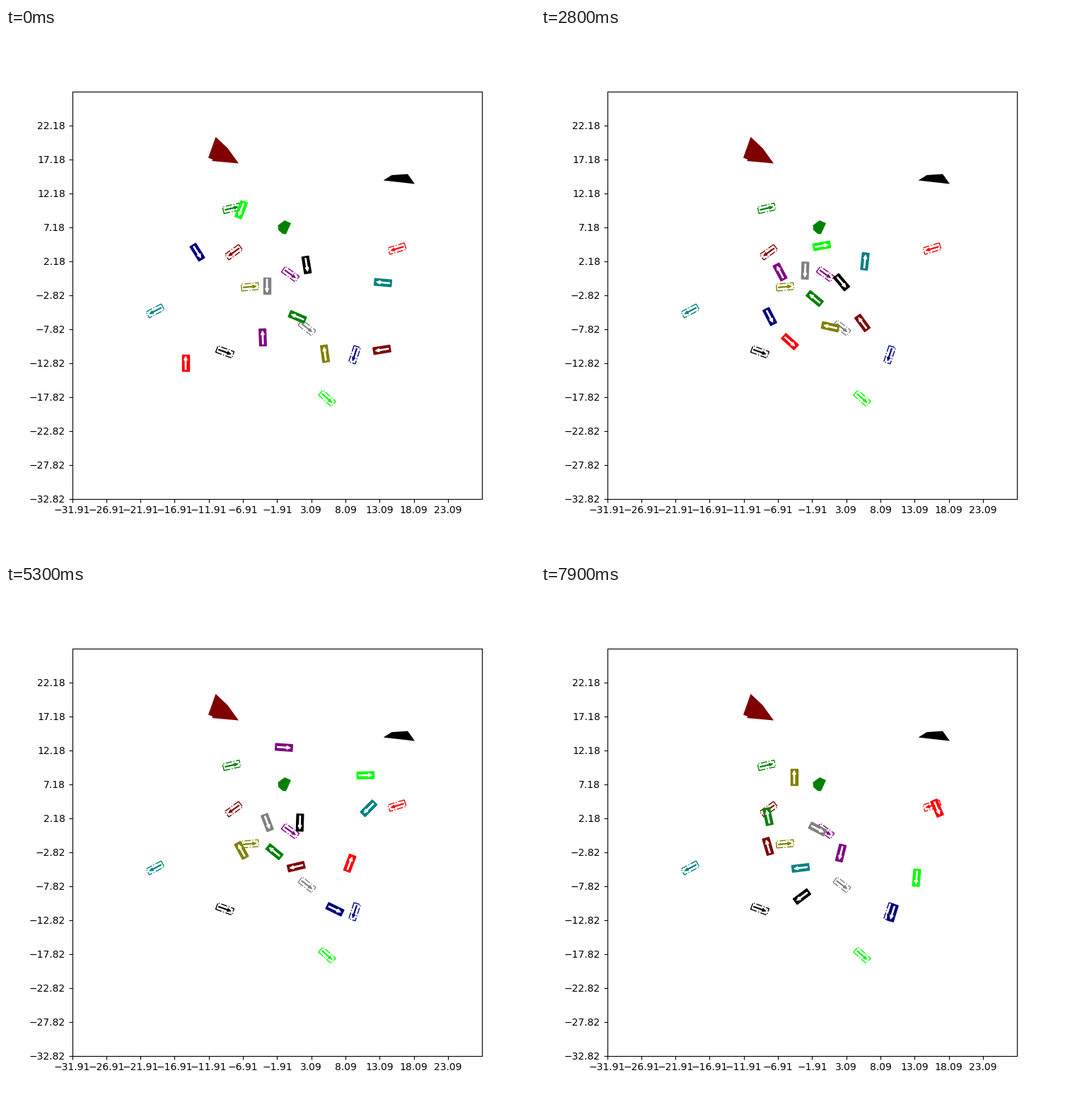
Write a matplotlib script that moves like this. It is 748 px wide and 748 px high and loops after 8000 ms.

```python
import numpy as np
import matplotlib.pyplot as plt
from matplotlib.animation import FuncAnimation
from matplotlib.patches import Polygon

SIZE, DPI = 748, 100
X0, Y0, SPAN = -31.91, -32.82, 60
LEFT, BASE = 0.125 * SIZE, 0.89 * SIZE
SX, SY = 0.775 * SIZE / SPAN, 0.77 * SIZE / SPAN
STEPS = np.array([0, 17, 27, 43, 60, 70, 78])

BOX = np.array([(-1.25, -0.5), (1.25, -0.5), (1.25, 0.5), (-1.25, 0.5)])
ARROW = np.array([(-0.98, -0.07), (0.4, -0.07), (0.4, -0.24), (0.95, 0),
                  (0.4, 0.24), (0.4, 0.07), (-0.98, 0.07)])


def to_data(px, py):
    return X0 + (px - LEFT) / SX, Y0 + (BASE - py) / SY


def place(shape, x, y, deg):
    a = np.radians(deg)
    c, s = np.cos(a), np.sin(a)
    return shape @ np.array([(c, s), (-s, c)]) + (x, y)


def key_slopes(rate):
    """Slopes at the keys: rest at the start, harmonic mean in between."""
    rate = np.array(rate, float)
    rate[0] *= 2            # the cars accelerate evenly from rest
    out = np.zeros(len(rate) + 1)
    for i, (a, b) in enumerate(zip(rate[:-1], rate[1:]), 1):
        if a * b > 0:
            out[i] = 2 * a * b / (a + b)
    out[-1] = rate[-1]
    return out


def hermite(u, p, q, m, n):
    return ((1 + 2 * u) * (1 - u) ** 2 * p + u * (1 - u) ** 2 * m
            + u * u * (3 - 2 * u) * q + u * u * (u - 1) * n)


class Car:
    def __init__(self, color, *keys):
        self.color = color
        keys = np.array(keys, float)
        x, y = to_data(keys[:, 0], keys[:, 1])
        deg = keys[:, 2]
        self.keys = np.column_stack([x, y, deg])
        dt = np.diff(STEPS)
        turn = np.diff(deg)
        move = np.diff(self.keys[:, :2], axis=0)
        mid = np.radians(deg[:-1] + turn / 2)
        way = np.where(move[:, 0] * np.cos(mid) + move[:, 1] * np.sin(mid) < 0, -1, 1)
        arc = np.hypot(*move.T) / np.sinc(turn / 360)
        speed = key_slopes(way * arc / dt)
        a = np.radians(deg)
        self.slopes = np.column_stack([speed * np.cos(a), speed * np.sin(a),
                                       key_slopes(turn / dt)])

    def pose(self, step):
        i = min(np.searchsorted(STEPS, step, side="right") - 1, len(STEPS) - 2)
        dt = STEPS[i + 1] - STEPS[i]
        return hermite((step - STEPS[i]) / dt, self.keys[i], self.keys[i + 1],
                       self.slopes[i] * dt, self.slopes[i + 1] * dt)

    def add(self, ax):
        self.box = ax.add_patch(Polygon(BOX, fc=self.color, ec=self.color, lw=1, zorder=3))
        self.arrow = ax.add_patch(Polygon(ARROW, fc="white", ec="white", lw=1, zorder=3))

    def move(self, step):
        pose = self.pose(step)
        self.box.set_xy(place(BOX, *pose))
        self.arrow.set_xy(place(ARROW, *pose))
        return [self.box, self.arrow]


# Each key: stage x, stage y, heading in degrees
teal = Car("teal", (533, 360, 175), (479.5, 370, 180), (458, 330, 84),
           (522, 277, -27), (456.5, 330, -195), (404, 352, -111), (367, 400, -173))
red = Car("red", (254, 473.5, 90), (295, 442, 22), (352, 443.5, -42),
          (439.5, 433.5, 40), (511, 350, 82), (538.5, 306, 9), (560, 315.5, -67))
green = Car("green", (412, 408.5, 157), (397.5, 394.5, 126), (387, 382.5, 140),
            (388, 383.5, 137), (366, 367.5, 146), (343.5, 361, 157), (321, 327.5, 102))
maroon = Car("maroon", (531.5, 455, 189), (482, 436, 152), (454.5, 417, 126),
             (416.5, 396.5, 195), (404, 399.5, 190), (358, 405, 160), (321, 369.5, 106))
olive = Car("olive", (451, 460.5, 98), (427.5, 429.5, 144), (409, 422.5, 167),
            (349, 417.5, 125), (321.5, 335, 112), (334.5, 297, 36), (358, 271.5, 90))
purple = Car("purple", (363, 437.5, 92), (341.5, 392.5, 98), (338, 345, 118),
             (340, 256, 45), (440, 247, -51), (438, 323, -113), (424, 379, -104))
gray = Car("gray", (369, 364.5, -90), (370, 356, -111), (373.5, 343, -92),
           (373.5, 347, -86), (366, 326.5, -52), (372, 332.5, -41), (391, 345, -28))
black = Car("black", (425, 335, -81), (429.5, 365, -62), (425, 359.5, -50),
            (414, 328, -87), (416, 351.5, -96), (407, 400, -114), (369, 440.5, -143))
navy = Car("navy", (270.5, 317, -58), (312.5, 352.5, -41), (323.5, 408, -63),
           (401.5, 469, 8), (497, 458, -70), (498, 465, -102), (497, 463.5, -107))
lime = Car("lime", (332.5, 257, -111), (346, 308, -42), (397, 308, 10),
           (468.5, 269.5, 45), (540, 302.5, -60), (559, 358.5, -117), (531, 414, -95))
CARS = [teal, red, green, maroon, olive, purple, gray, black, navy, lime]

GOALS = [(211, 400, 208), (553, 312, 197), (319, 255, 13), (322, 317, 216),
         (345, 366, 5), (402, 348, -36), (425.5, 424, -38), (309.5, 458, -20),
         (493, 462, 252), (454, 523.5, -42)]

BLOCKS = {
    "maroon": [(296.5, 154), (313.5, 170), (329, 191.5), (291, 188), (292.5, 186), (286, 183.5)],
    "green": [(394, 272), (403, 276), (396, 291.5), (391, 291), (385, 285.5), (384.5, 279)],
    "black": [(533.5, 215.5), (545.5, 208), (568, 206.5), (578, 220.5)],
}

fig, ax = plt.subplots(figsize=(SIZE / DPI, SIZE / DPI), dpi=DPI)
ax.set_xlim(X0, X0 + SPAN)
ax.set_ylim(Y0, Y0 + SPAN)
ax.set_xticks(np.arange(X0, X0 + 56, 5))
ax.set_yticks(np.arange(Y0, Y0 + 56, 5))
ax.xaxis.set_major_formatter("{x:.2f}")
ax.yaxis.set_major_formatter("{x:.2f}")

for color, pts in BLOCKS.items():
    ax.add_patch(Polygon([to_data(*p) for p in pts], fc=color, ec="none"))

for car, (px, py, deg) in zip(CARS, GOALS):
    spot = (*to_data(px, py), deg)
    ax.add_patch(Polygon(place(BOX, *spot), fill=False, ec=car.color, lw=1, ls="-."))
    ax.add_patch(Polygon(place(ARROW, *spot), fc=car.color, ec=car.color, lw=0.6))

for car in CARS:
    car.add(ax)


def draw(frame):
    step = max(0, frame - 1)    # the opening pose is held twice as long
    return [part for car in CARS for part in car.move(step)]


anim = FuncAnimation(fig, draw, frames=80, init_func=lambda: draw(0),
                     interval=100, repeat=True, repeat_delay=0)
plt.show()
```
